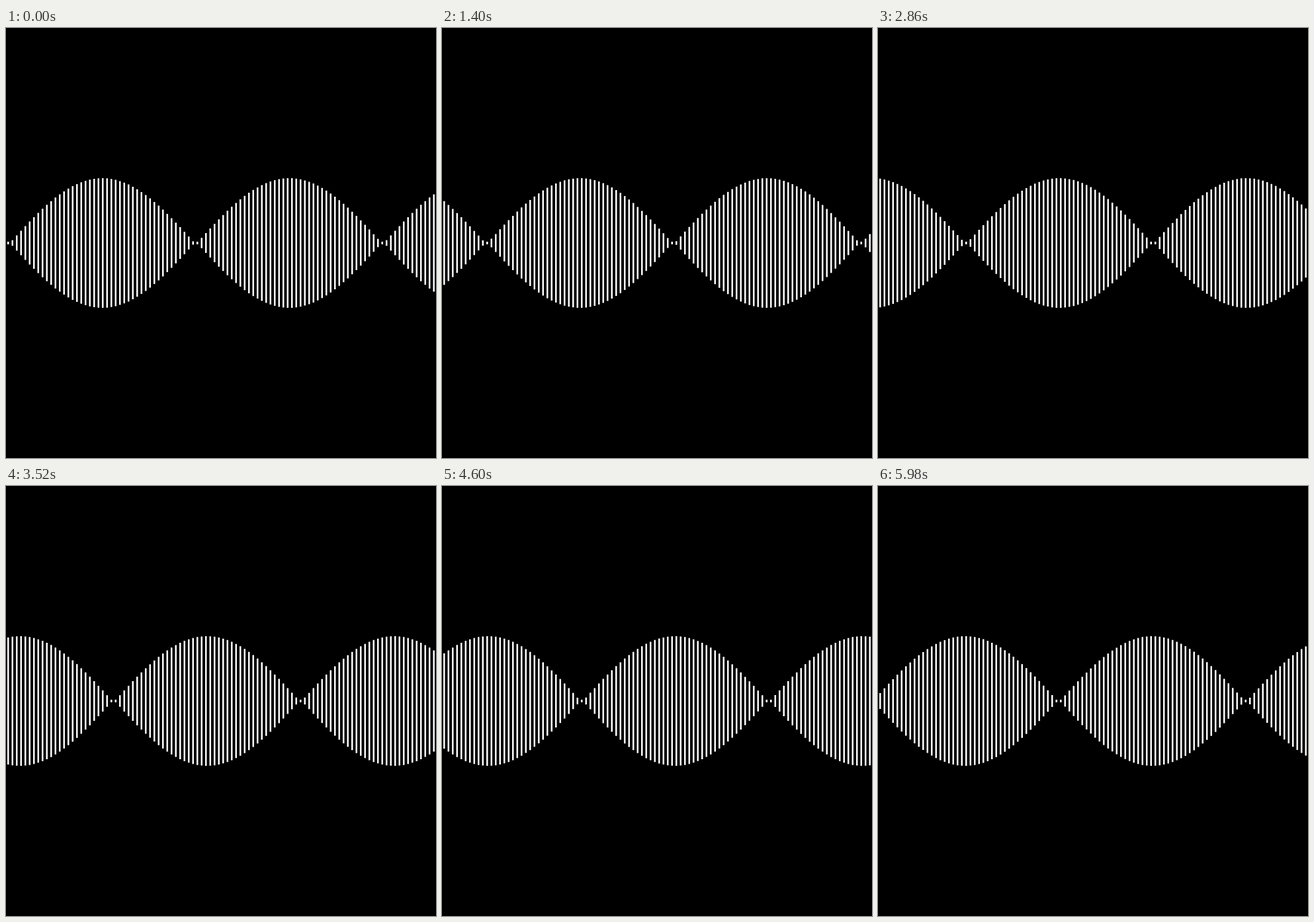
Recreate the animation shown at these times as an HTML page. Size 650 by 650 pixels, loop 6000 ms.

```html
<!DOCTYPE html>
<html lang="en">
<head>
<meta charset="utf-8">
<title>Travelling bars</title>
<style>
  html, body { margin: 0; width: 100%; height: 100%; overflow: hidden; background: #000; }
  svg { display: block; width: 100vw; height: 100vh; }
</style>
</head>
<body>
<svg viewBox="0 0 650 650"><path id="bars" fill="#fff"/></svg>
<script>
  const LOOP = 6000, STEP = 20;
  const COUNT = 100, PITCH = 6.5, GAP = 4;
  const CENTER = 325, AMPLITUDE = 100, WAVE = 90, MIN_HALF = 2;
  const bars = document.getElementById('bars');

  function bar(i, phase) {
    const swing = AMPLITUDE * Math.abs(Math.sin(i * PITCH / WAVE - phase));
    const half = Math.max(MIN_HALF, swing - GAP / 2);
    const x = i * PITCH + GAP / 2;
    const width = PITCH - GAP;
    return `M${x} ${CENTER - half}h${width}v${2 * half}h${-width}z`;
  }

  function render(ms) {
    const tick = Math.floor((ms % LOOP) / STEP);
    const phase = 0.01 * (tick + 1);
    bars.setAttribute('d', Array.from({ length: COUNT }, (_, i) => bar(i, phase)).join(''));
  }

  const start = performance.now();
  function frame() {
    render(performance.now() - start);
    requestAnimationFrame(frame);
  }
  frame();
</script>
</body>
</html>
```
